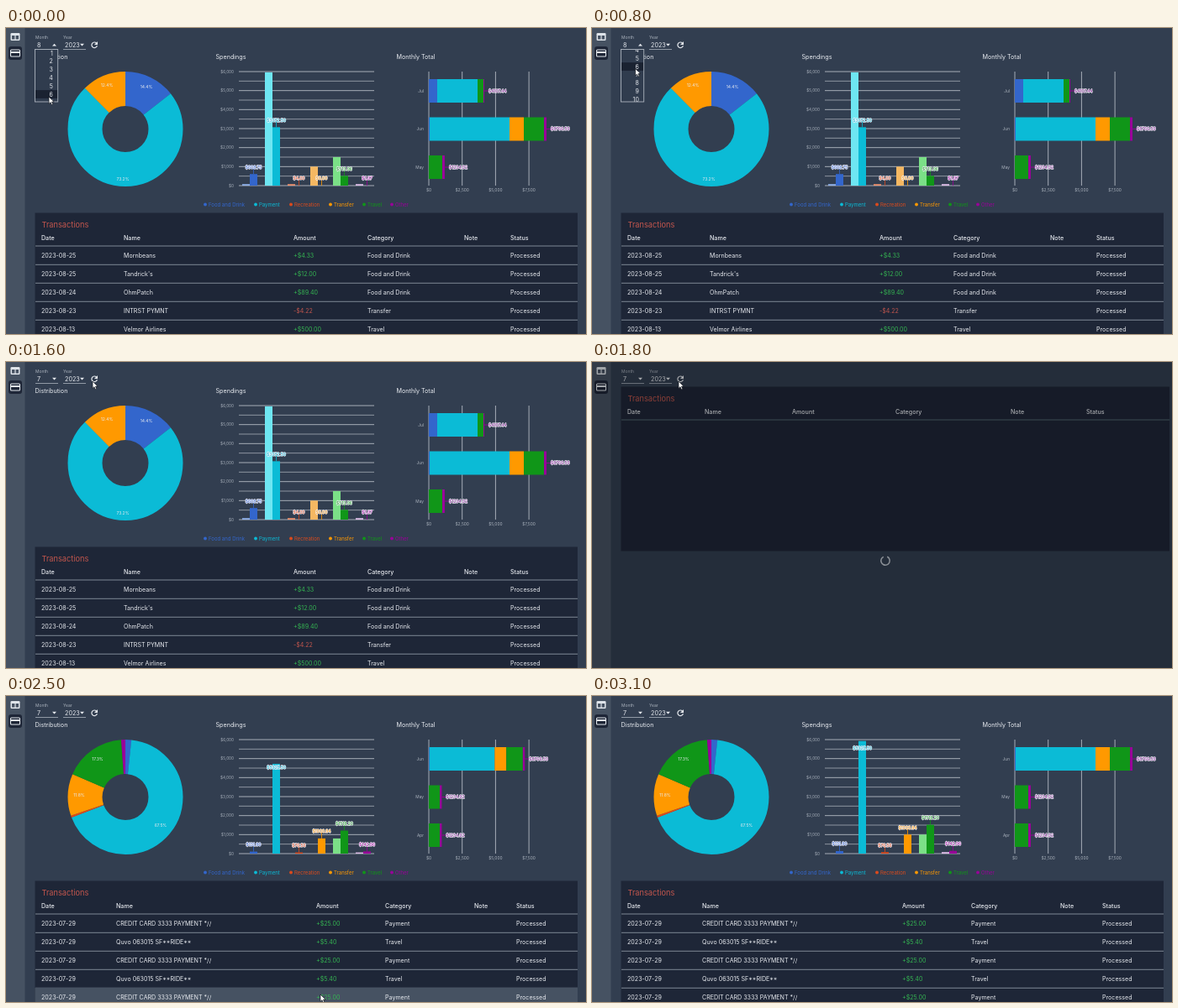
These frames come from a looping animation (690 by 365 pixels, 3700 ms). An HTML page:

```html
<!DOCTYPE html>
<html lang="en">
<head>
<meta charset="utf-8">
<title>Spending dashboard</title>
<style>
  html, body { margin: 0; width: 100%; height: 100%; overflow: hidden; background: #323e50; }
  svg { display: block; width: 690px; height: 365px; font-family: Inter, "Open Sans", sans-serif; }
  .note { paint-order: stroke; stroke: #f4f2fa; stroke-width: 1.3px; stroke-linejoin: round; }
</style>
</head>
<body>
<svg id="stage" viewBox="0 0 690 365"></svg>
<script>
const LOOP = 3700, STEP = 100;
const PANEL = '#1e2637', SIDE = '#465262', WHITE = '#e8ebf0', GREY = '#aab2bd', GRID = '#b4bac3';
const GREEN = '#35b552', RED = '#c2564d';

const kinds = [
  { name: 'Food and Drink', color: '#3366cc', light: '#8fb0e8', x: 237 },
  { name: 'Payment', color: '#0bbbd6', light: '#6ee6f2', x: 297 },
  { name: 'Recreation', color: '#dc4a1c', light: '#f0936f', x: 339 },
  { name: 'Transfer', color: '#ff9900', light: '#f5b862', x: 386 },
  { name: 'Travel', color: '#109618', light: '#7be087', x: 426 },
  { name: 'Other', color: '#990099', light: '#dcbce6', x: 459 }
];

const card = ['2023-07-29', 'CREDIT CARD 3333 PAYMENT *//', '+$25.00', 'Payment'];
const ride = ['2023-07-29', 'Quvo 063015 SF**RIDE**', '+$5.40', 'Travel'];

const august = {
  shares: [14.4, 73.2, 0, 12.4, 0, 0],
  pieLabels: [['14.4%', 167, 70], ['73.2%', 139, 180], ['12.4%', 120, 68]],
  spend: [[80, 608.75], [5960, 3072.5], [77, 4], [1000, 0], [1500, 513.96], [80, 1.97]],
  months: [
    ['Jul', [10, 48, 0, 0, 7, 1], '$4107.44'],
    ['Jun', [1, 95, 0, 17, 24, 3], '$8766.59'],
    ['May', [0, 0, 0, 0, 16, 3], '$1234.92']
  ],
  cols: [42, 140, 342, 430, 545, 600],
  rows: [
    ['2023-08-25', 'Mornbeans', '+$4.33', 'Food and Drink'],
    ['2023-08-25', "Tandrick's", '+$12.00', 'Food and Drink'],
    ['2023-08-24', 'OhmPatch', '+$89.40', 'Food and Drink'],
    ['2023-08-23', 'INTRST PYMNT', '-$4.22', 'Transfer'],
    ['2023-08-13', 'Velmor Airlines', '+$500.00', 'Travel']
  ]
};
const july = {
  shares: [1.7, 67.5, 0.5, 11.8, 17.3, 1.2],
  pieLabels: [['67.5%', 184, 154], ['11.8%', 87, 118], ['17.3%', 109, 75]],
  spend: [[0, 131.8], [0, 5925.5], [0, 76.56], [0, 1000.84], [1000, 1518.2], [80, 142.96]],
  months: [
    ['Jun', [1, 95, 0, 17, 24, 3], '$8766.59'],
    ['May', [0, 0, 0, 0, 16, 3], '$1234.92'],
    ['Apr', [0, 0, 0, 0, 16, 3], '$1234.92']
  ],
  cols: [42, 131, 369, 451, 557, 607],
  rows: [card, ride, card, ride, card]
};
const loadingCols = [42, 134, 238, 361, 498, 588];

// Pointer path: time, x, y
const path = [
  [0, 51, 82], [400, 51, 52], [500, 51, 52], [1000, 52, 46], [1100, 52, 46],
  [1200, 64, 32], [1600, 103, 23], [1800, 103, 23], [2100, 377, 251],
  [2500, 374, 356], [3100, 374, 375], [LOOP, 374, 375]
];

const clamp = v => Math.max(0, Math.min(1, v));
const span = (t, a, b) => clamp((t - a) / (b - a));
const easeOut = p => 1 - (1 - p) * (1 - p);

const rect = (x, y, w, h, fill, more = '') =>
  `<rect x="${x}" y="${y}" width="${w}" height="${h}" fill="${fill}" ${more}/>`;
const line = (x1, y1, x2, y2, stroke, w = 1) =>
  `<path d="M${x1} ${y1}L${x2} ${y2}" stroke="${stroke}" stroke-width="${w}"/>`;
const text = (s, x, y, size, fill = WHITE, more = '') =>
  `<text x="${x}" y="${y + size * 0.36}" font-size="${size}" fill="${fill}" ${more}>${s}</text>`;
const MID = 'text-anchor="middle"', END = 'text-anchor="end"', BOLD = 'font-weight="500"';

function pointerAt(t) {
  const i = Math.max(1, path.findIndex(k => k[0] >= t));
  const [a, b] = [path[i - 1], path[i]];
  const p = span(t, a[0], b[0]);
  return [a[1] + (b[1] - a[1]) * p, a[2] + (b[2] - a[2]) * p];
}

function sidebar() {
  return rect(0, 0, 22.5, 365, SIDE) +
    rect(5.5, 6, 11, 9, '#dfe4ea', 'rx="1.3"') +
    rect(7, 9, 3.4, 4.5, SIDE) + rect(11.6, 9, 3.4, 4.5, SIDE) +
    rect(3, 22, 16, 16, PANEL, 'rx="3"') +
    rect(5.5, 26, 11, 8, 'none', 'rx="1" stroke="#dfe4ea" stroke-width="1.1"') +
    rect(5.5, 28, 11, 2, '#dfe4ea');
}

function controls(month, open) {
  const field = (label, value, x, up) =>
    text(label, x, 11, 5, GREY) + text(value, x + 2, 20, 7.2) +
    `<path d="M${x + 20} ${up ? 21.5 : 18.7}h5l-2.5 ${up ? -2.8 : 2.8}z" fill="${WHITE}"/>` +
    line(x, 25.5, x + 27, 25.5, GREY, 0.8);
  return field('Month', month, 35, open) + field('Year', 2023, 68, false) +
    `<path d="M107.6 18A3.3 3.3 0 1 0 108.4 21.2" fill="none" stroke="${WHITE}" stroke-width="1.2"/>
     <path d="M109 16v4h-4z" fill="${WHITE}"/>`;
}

function dropdown(scroll, y) {
  const pitch = 9.8, top = 25.1 - scroll;
  const hover = Math.floor((y - top) / pitch);
  let items = '';
  for (let i = 0; i < 12; i++) {
    const rowTop = top + i * pitch;
    if (i === hover) items += rect(35, rowTop, 27, pitch, '#1a2231');
    items += text(i + 1, 55.8, rowTop + 4.9, 7, WHITE, END);
  }
  return '<clipPath id="list"><rect x="34" y="25.5" width="28" height="62.5"/></clipPath>' +
    rect(34.5, 25.5, 27.2, 62.5, '#303c4e') + `<g clip-path="url(#list)">${items}</g>` +
    rect(34.5, 25.5, 27.2, 62.5, 'none', `stroke="${GREY}" stroke-width=".9"`);
}

function donut(data) {
  let from = 0, out = '';
  data.shares.forEach((share, i) => {
    if (share) out += `<circle r="48" stroke="${kinds[i].color}" pathLength="100"
      stroke-dasharray="${share + 0.05} 100" stroke-dashoffset="${-from}"/>`;
    from += share;
  });
  return text('Distribution', 34.5, 34, 7.2) +
    `<g transform="translate(142 120.5) rotate(-90)" fill="none" stroke-width="41">${out}</g>` +
    data.pieLabels.map(([s, x, y]) => text(s, x, y, 5, WHITE, MID)).join('');
}

function spendings(data, p) {
  const base = 188, unit = 136 / 6000;
  let out = text('Spendings', 249.5, 34, 7.2), notes = '';
  for (let v = 0; v <= 6000; v += 500) {
    const y = base - v * unit;
    const major = v % 1000 === 0;
    out += line(277, y, 438, y, GRID, major ? 0.9 : 0.7);
    if (major) out += text('$' + v.toLocaleString('en-US'), 271, y, 4.7, GREY, END);
  }
  data.spend.forEach(([before, now], i) => {
    const { color, light } = kinds[i], x = 290 + i * 27;
    const h = now * unit * p, top = base - h;
    const dip = data === july && i === 1 ? 17.5 * p ** 1.5 : 0;
    const y = top - 8.5 + dip;
    out += rect(x - 9, base - before * unit * p, 9, before * unit * p, light) +
      rect(x, top, 9, h, color);
    if (!dip) out += line(x + 4.5, y, x + 4.5, top, color, 0.8);
    notes += text('$' + now.toFixed(2), x + 4.5, y, 5, color, MID + ' class="note"');
  });
  return out + notes;
}

function totals(data, p) {
  let out = text('Monthly Total', 464.5, 34, 7.2);
  [0, 2500, 5000, 7500].forEach((v, i) => {
    const x = 503 + i * 39.7;
    out += line(x, 52, x, 188, GRID, 0.9) +
      text('$' + v.toLocaleString('en-US'), x, 193, 4.9, GREY, MID);
  });
  data.months.forEach(([month, parts, sum], row) => {
    const y = 75 + row * 45.5;
    let x = 503;
    parts.forEach((w, i) => {
      out += rect(x, y - 14, w * p, 28, kinds[i].color);
      x += w * p;
    });
    out += text(month, 497, y, 4.8, GREY, END) + line(x, y, x + 6, y, '#990099', 0.9) +
      text(sum, x + 5, y, 5, '#7a1d8c', 'class="note"');
  });
  return out;
}

const legend = () => kinds.map(k =>
  `<circle cx="${k.x}" cy="210.5" r="1.9" fill="${k.color}"/>` +
  text(k.name, k.x + 4, 210.5, 6, k.color)).join('');

function tableHead(cols, top, right, rule) {
  const names = ['Date', 'Name', 'Amount', 'Category', 'Note', 'Status'];
  return text('Transactions', 42.5, top + 14.5, 9.2, RED) +
    names.map((s, i) => text(s, cols[i], top + 30.2, 7.1, WHITE, BOLD)).join('') +
    line(35, top + 39.5, right, top + 39.5, rule, 0.9);
}

function table(data, pointerY) {
  const hover = Math.floor((pointerY - 260) / 22);
  let out = rect(34.5, 220.5, 645.5, 145, PANEL);
  data.rows.forEach((row, r) => {
    const top = 260 + r * 22;
    if (r === hover) out += rect(34.5, top, 645.5, 22, SIDE);
    [...row, '', 'Processed'].forEach((s, i) => {
      const color = i !== 2 ? WHITE : s[0] === '+' ? GREEN : RED;
      out += text(s, data.cols[i], top + 11, 7.1, color);
    });
    out += line(35, top + 22.3, 680, top + 22.3, '#8a93a0', 0.9);
  });
  return out + tableHead(data.cols, 220.5, 680, '#8a93a0');
}

function loading(t) {
  return rect(34.5, 29.5, 652.5, 196, PANEL) + tableHead(loadingCols, 29.5, 687, '#566e78') +
    `<circle r="5.2" transform="translate(349 237) rotate(${(t - 1800) * 0.6 - 65})" fill="none"
      stroke="#c3cad2" stroke-width="1.5" pathLength="100" stroke-dasharray="86 14"/>` +
    rect(0, 0, 690, 365, '#000', 'opacity=".28"');
}

const pointer = (x, y) =>
  `<path transform="translate(${x} ${y})" d="M0 0V8.4L2 6.7L3.4 9.7L4.8 9L3.5 6.1H6.2Z"
    fill="#fff" stroke="#10151d" stroke-width=".7"/>`;

function scene(t) {
  const [x, y] = pointerAt(t);
  const open = t < 1300;
  const shell = rect(0, 0, 690, 365, '#323e50') + sidebar() + controls(open ? 8 : 7, open);
  if (t >= 1800 && t < 2100) return shell + loading(t) + pointer(x, y);

  const loaded = t >= 2100, data = loaded ? july : august;
  const grow = (from, to) => loaded ? easeOut(span(t, from, to)) : 1;
  return shell + donut(data) + spendings(data, grow(2060, 2860)) + totals(data, grow(2100, 2800)) +
    legend() + table(data, y < 365 ? y : 0) +
    (open ? dropdown(55 * span(t, 500, 1000), y) : '') + pointer(x, y);
}

const stage = document.getElementById('stage');
const start = performance.now();
let shown = -1;
function draw() {
  const t = Math.floor((performance.now() - start) % LOOP / STEP) * STEP;
  if (t !== shown) stage.innerHTML = scene(shown = t);
  requestAnimationFrame(draw);
}
draw();
</script>
</body>
</html>
```
